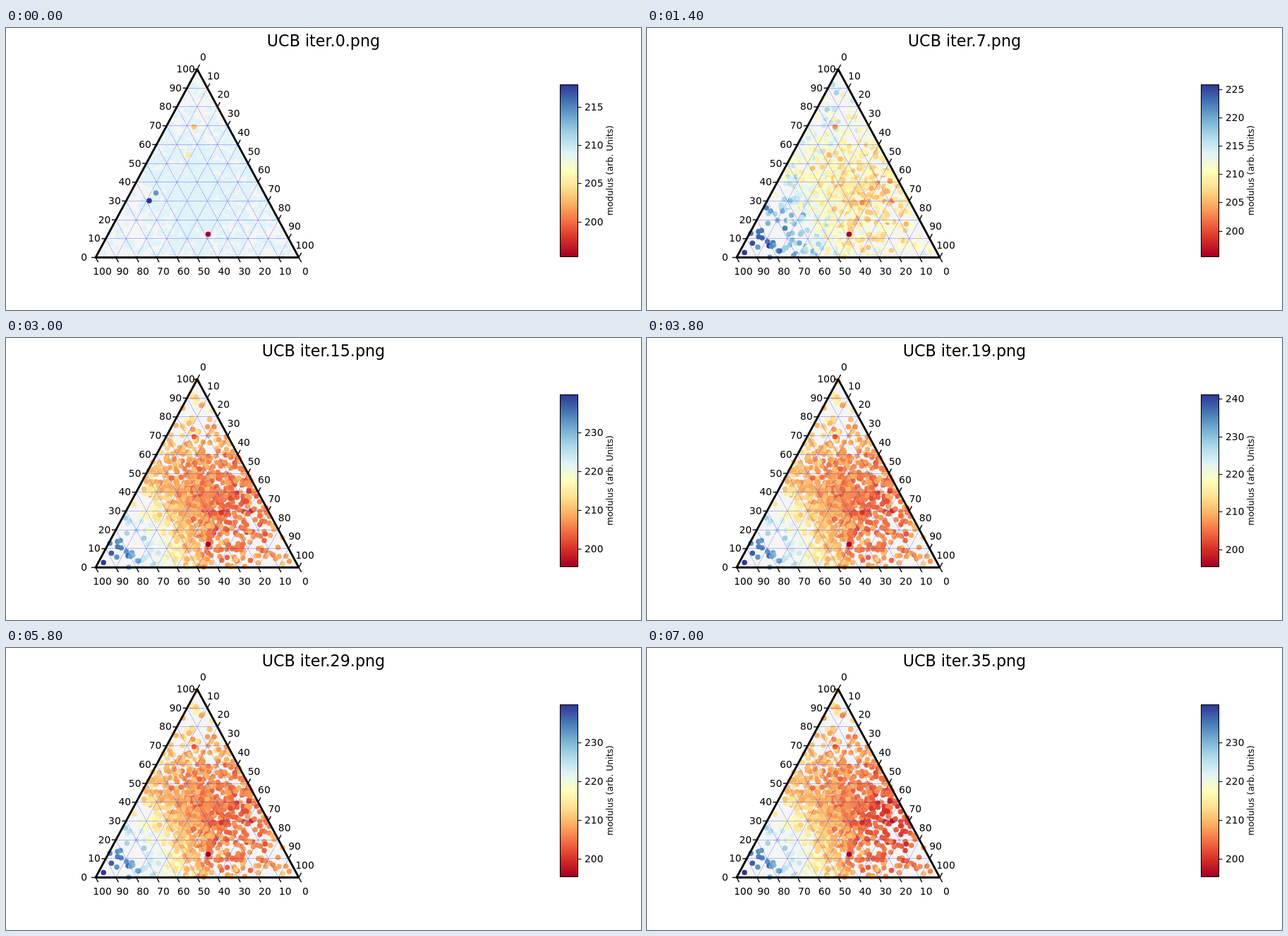
Animation of 900 by 400 pixels, one loop 7.2 s. Source, as an HTML page with a canvas:

```html
<!DOCTYPE html>
<html>
<head>
<meta charset="utf-8">
<style>
html, body { margin: 0; width: 900px; height: 400px; overflow: hidden; background: #fff; }
canvas { display: block; }
</style>
</head>
<body>
<canvas id="stage" width="900" height="400"></canvas>
<script>
const ctx = document.getElementById('stage').getContext('2d');
const STEP = 200, COUNT = 36, VMIN = 195.46;
const LEFT = 127, RIGHT = 415, TOP = 58.5, BASE = 325.5, APEX = 271;
const DX = (RIGHT - APEX) / 10, DY = (BASE - TOP) / 10;
const BAR = { x: 785.5, y: 80.5, w: 25, h: 244 };

// RdYlBu colour map
const STOPS = ['a50026', 'd73027', 'f46d43', 'fdae61', 'fee090', 'ffffbf',
  'e0f3f8', 'abd9e9', '74add1', '4575b4', '313695']
  .map(hex => [0, 2, 4].map(i => parseInt(hex.slice(i, i + 2), 16)));

// Upper end of the colour scale: iteration, value
const SCALE = [[0, 217.9], [7, 225.85], [10, 234.7], [15, 239.75], [23, 242.6], [29, 239.75]];

// Starting samples with a known modulus
const MEASURED = [
  { x: 258, y: 180, value: 205 },
  { x: 212.5, y: 234, value: 214.2 },
  { x: 203, y: 245, value: 217.9 },
  { x: 266.5, y: 140, value: 203.2 },
  { x: 286.5, y: 292.5, value: VMIN }
];

let seed = 20417;
function random() {
  seed = (seed * 1664525 + 1013904223) % 4294967296;
  return seed / 4294967296;
}

// Three normalised uniform parts: dense in the middle, sparse in the corners
function randomPoint() {
  const parts = [random(), random(), random()];
  const sum = parts[0] + parts[1] + parts[2];
  const [left, top, right] = parts.map(v => v / sum);
  return {
    x: LEFT * left + APEX * top + RIGHT * right,
    y: BASE - (BASE - TOP) * top,
    noise: (random() + random() + random() - 1.5) * 2
  };
}
const points = [...Array.from({ length: 1050 }, randomPoint), ...MEASURED];

function smoothstep(from, to, v) {
  const u = Math.min(Math.max((v - from) / (to - from), 0), 1);
  return u * u * (3 - 2 * u);
}

function scaleMax(iteration) {
  const next = SCALE.findIndex(([at]) => at > iteration);
  if (next < 0) return SCALE[SCALE.length - 1][1];
  const [[i0, v0], [i1, v1]] = SCALE.slice(next - 1, next + 1);
  return v0 + (v1 - v0) * (iteration - i0) / (i1 - i0);
}

// The model first gains contrast, then settles, then shifts to the right edge
function modelAt(iteration) {
  const gain = Math.min(1, iteration / 7);
  const settled = smoothstep(4.5, 12, iteration);
  const late = smoothstep(29, 35, iteration);
  const base = .6 - .3 * settled;
  return {
    vmax: scaleMax(iteration),
    base,
    rise: gain * (1 - base),
    hot: gain * (.15 - .05 * settled + .06 * late),
    hotX: 320 + 32 * late,
    top: gain * (.1 - .05 * late),
    noise: gain * (.075 - .03 * settled)
  };
}

function bump(p, x, y, width) {
  return Math.exp(-((p.x - x) ** 2 + (p.y - y) ** 2) / width ** 2);
}

function level(p, m) {
  if (p.value) return (p.value - VMIN) / (m.vmax - VMIN);
  return m.base + m.rise * bump(p, LEFT, BASE, 95) - m.hot * bump(p, m.hotX, 245, 80)
    + m.top * bump(p, APEX, 80, 70) + m.noise * p.noise;
}

function colour(t) {
  const u = Math.min(Math.max(t, 0), 1) * 10;
  const i = Math.min(9, Math.floor(u));
  return `rgb(${STOPS[i].map((v, k) => Math.round(v + (STOPS[i + 1][k] - v) * (u - i)))})`;
}

function line(x1, y1, x2, y2) {
  ctx.beginPath();
  ctx.moveTo(x1, y1);
  ctx.lineTo(x2, y2);
  ctx.stroke();
}

function snap(v) {
  return Math.floor(v) + .5;
}

function text(str, x, y, size = 13.89, align = 'center') {
  ctx.font = `${size}px "DejaVu Sans", sans-serif`;
  ctx.textAlign = align;
  ctx.fillStyle = '#000';
  ctx.fillText(str, x, Math.round(y));
}

function trianglePath() {
  ctx.beginPath();
  ctx.moveTo(LEFT, BASE);
  ctx.lineTo(RIGHT, BASE);
  ctx.lineTo(APEX, TOP);
  ctx.closePath();
}

function drawPoints(model) {
  trianglePath();
  ctx.fillStyle = '#f5f5f5';
  ctx.fill();
  for (const p of points) {
    ctx.fillStyle = colour(level(p, model));
    ctx.beginPath();
    ctx.arc(p.x, p.y, 3.75, 0, 2 * Math.PI);
    ctx.fill();
  }
}

function drawGrid() {
  ctx.strokeStyle = '#00f';
  ctx.lineWidth = .7;
  ctx.setLineDash([.7, 1.15]);
  for (let i = 1; i < 10; i++) {
    const dx = DX * i, y = BASE - DY * i, foot = LEFT + 2 * dx;
    line(LEFT + dx, snap(y), RIGHT - dx, snap(y));
    line(foot, BASE, APEX + dx, TOP + DY * i);
    line(foot, BASE, LEFT + dx, y);
  }
  ctx.setLineDash([]);
}

function drawAxes() {
  ctx.strokeStyle = '#000';
  ctx.lineWidth = 2.78;
  ctx.lineJoin = 'round';
  trianglePath();
  ctx.stroke();
  ctx.lineWidth = 1.39;
  for (let i = 0; i <= 10; i++) {
    const dx = DX * i, y = TOP + DY * i, foot = LEFT + 2 * dx;
    line(APEX - dx, y, APEX - dx - 6, y);
    line(APEX + dx, y, APEX + dx + 3.6, y - 6.7);
    line(foot, BASE, foot + 3.6, BASE + 6.7);
    text(100 - 10 * i, APEX - dx - 16.3, y + 4.5);
    text(10 * i, APEX + dx + 8.5, y - 12.5);
    text(100 - 10 * i, foot + 9.5, 350);
  }
}

function drawBar(vmax) {
  for (let i = 0; i < BAR.h; i++) {
    ctx.fillStyle = colour(1 - i / (BAR.h - 1));
    ctx.fillRect(BAR.x, BAR.y + i - .5, BAR.w, 1.5);
  }
  ctx.strokeStyle = '#000';
  ctx.lineWidth = 1.1;
  ctx.strokeRect(BAR.x, BAR.y, BAR.w, BAR.h);
  const gap = vmax - VMIN > 40 ? 10 : 5;
  for (let v = 200; v <= vmax; v += gap) {
    const y = snap(BAR.y + BAR.h * (vmax - v) / (vmax - VMIN));
    line(BAR.x + BAR.w, y, BAR.x + BAR.w + 5, y);
    text(v, 820, y + 4.5, 13.89, 'left');
  }
  ctx.save();
  ctx.translate(860, 202);
  ctx.rotate(-Math.PI / 2);
  text('modulus (arb. Units)', 0, 0, 12.5);
  ctx.restore();
}

function draw(iteration) {
  const model = modelAt(iteration);
  ctx.fillStyle = '#fff';
  ctx.fillRect(0, 0, 900, 400);
  drawPoints(model);
  drawGrid();
  drawAxes();
  drawBar(model.vmax);
  text(`UCB iter.${iteration}.png`, 450, 26, 22.22);
}

function tick() {
  draw(Math.floor(performance.now() / STEP) % COUNT);
  requestAnimationFrame(tick);
}
tick();
</script>
</body>
</html>
```
